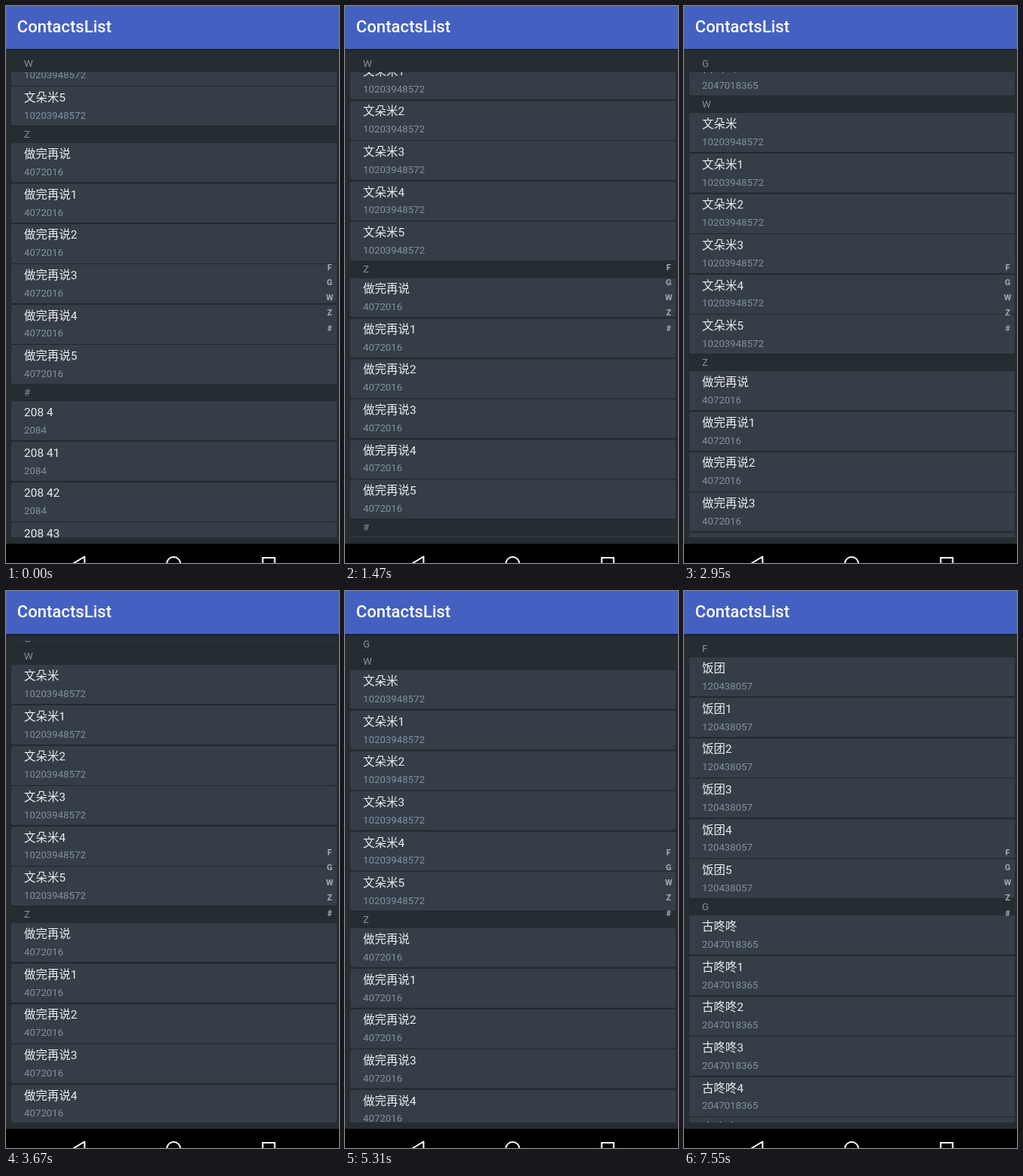
An HTML page for the animation above (8000 ms loop, 443 by 740 pixels).

```html
<!DOCTYPE html>
<html lang="zh-CN">
<head>
<meta charset="utf-8">
<title>ContactsList</title>
<style>
  html, body { margin: 0; width: 100%; height: 100%; overflow: hidden; background: #252d33; }
  body { position: relative; font-family: Roboto, "Noto Sans CJK SC", "Noto Sans CJK", sans-serif; }
  div, svg { position: absolute; white-space: nowrap; }
  #bar { left: 0; top: 0; width: 443px; height: 57px; background: #4460c1; box-shadow: 0 1px 3px rgba(0,0,0,.45); }
  #title { left: 14.8px; top: -1px; font: 500 22.15px/56px Roboto, sans-serif; color: #fff; }
  #list { left: 0; top: 65.5px; width: 443px; height: 640.5px; overflow: hidden; }
  #rows { left: 0; top: 0; width: 443px; }
  .card { left: 7px; width: 432.5px; height: 52px; border-radius: 2px; background: #353d46; box-shadow: 0 1px 1px rgba(0,0,0,.16); }
  .name { left: 17px; top: 4.9px; font-size: 15.5px; line-height: 20px; color: #eceef0; }
  .phone { left: 17px; top: 30.6px; font-size: 13.29px; line-height: 16px; color: #8290a5; }
  .head { left: 0; width: 443px; height: 22.9px; background: #252d33; z-index: 1; color: #8290a5;
          font-size: 13.29px; line-height: 22.9px; text-indent: 24px; }
  .head::after { content: ""; position: absolute; left: 7px; right: 3.5px; bottom: 0; height: 1px; background: #232a30; }
  .key { left: 420.5px; width: 20px; text-align: center; font: bold 11px/14px Roboto, sans-serif; color: #a9aeb3; }
  #nav { left: 0; top: 714px; }
</style>
</head>
<body>
<div id="list"><div id="rows"></div></div>
<div id="keys"></div>
<div id="bar"><div id="title">ContactsList</div></div>
<svg id="nav" width="443" height="26" viewBox="0 714 443 26">
  <path d="M0 714.6h443v26H0z"/>
  <g fill="none" stroke="#fff" stroke-width="2">
    <path d="M104.5 731.5V751L88.5 741.2Z" stroke-linejoin="round"/>
    <circle cx="223" cy="741" r="9"/>
    <rect x="341.5" y="733" width="16" height="16"/>
  </g>
</svg>
<script>
const HEAD = 22.9, PITCH = 53.6, SECTION = 343, COUNT = 6, LOOP = 8000;
const groups = [
  ["F", "饭团", "120438057"],
  ["G", "古咚咚", "2047018365"],
  ["W", "文朵米", "10203948572"],
  ["Z", "做完再说", "4072016"],
  ["#", "208 4", "2084"]
];

// [tick, scroll offset]
const path = [
  [0, 935], [6, 828], [15, 665.5], [16, 648], [17, 635], [18, 628], [19, 628],
  [20, 632], [22, 650], [25, 676], [27, 689], [30, 699], [31, 698], [33, 689],
  [35, 676], [36, 669.3], [38, 646], [42, 587], [43, 577], [44, 571], [45, 571],
  [46, 535], [47, 440], [48, 290], [49, 150], [50, 45], [51, 0]
];

function add(parent, cls, text = "", top) {
  const el = document.createElement("div");
  el.className = cls;
  el.textContent = text;
  if (top !== undefined) el.style.top = top + "px";
  return parent.appendChild(el);
}

const rows = document.getElementById("rows");
const keys = document.getElementById("keys");
const heads = groups.map(([letter, name, phone], k) => {
  const top = k * SECTION;
  for (let i = 0; i < COUNT; i++) {
    const card = add(rows, "card", "", top + HEAD + i * PITCH);
    add(card, "name", name + (i || ""));
    add(card, "phone", phone);
  }
  add(keys, "key", letter, 340.7 + k * 20.2);
  return add(rows, "head", letter, top);
});

// The screen refreshes in ticks, slightly slower in the second half.
function tickAt(ms) {
  const n = ms < 3665 ? ms / 146.6 : 25 + (ms - 3665) / 149.2;
  return Math.min(51, Math.floor(n));
}

function scrollAt(tick) {
  const i = path.findIndex(p => p[0] >= tick);
  if (i < 1) return path[0][1];
  const [t0, s0] = path[i - 1], [t1, s1] = path[i];
  return s0 + (s1 - s0) * (tick - t0) / (t1 - t0);
}

function draw(ms) {
  const s = scrollAt(tickAt(ms));
  rows.style.transform = `translateY(${-s}px)`;
  heads.forEach((el, k) => {
    const stick = Math.max(0, Math.min(s - k * SECTION, SECTION - HEAD));
    el.style.transform = `translateY(${stick}px)`;
  });
}

const start = performance.now();
function frame() {
  draw((performance.now() - start) % LOOP);
  requestAnimationFrame(frame);
}
frame();
</script>
</body>
</html>
```
